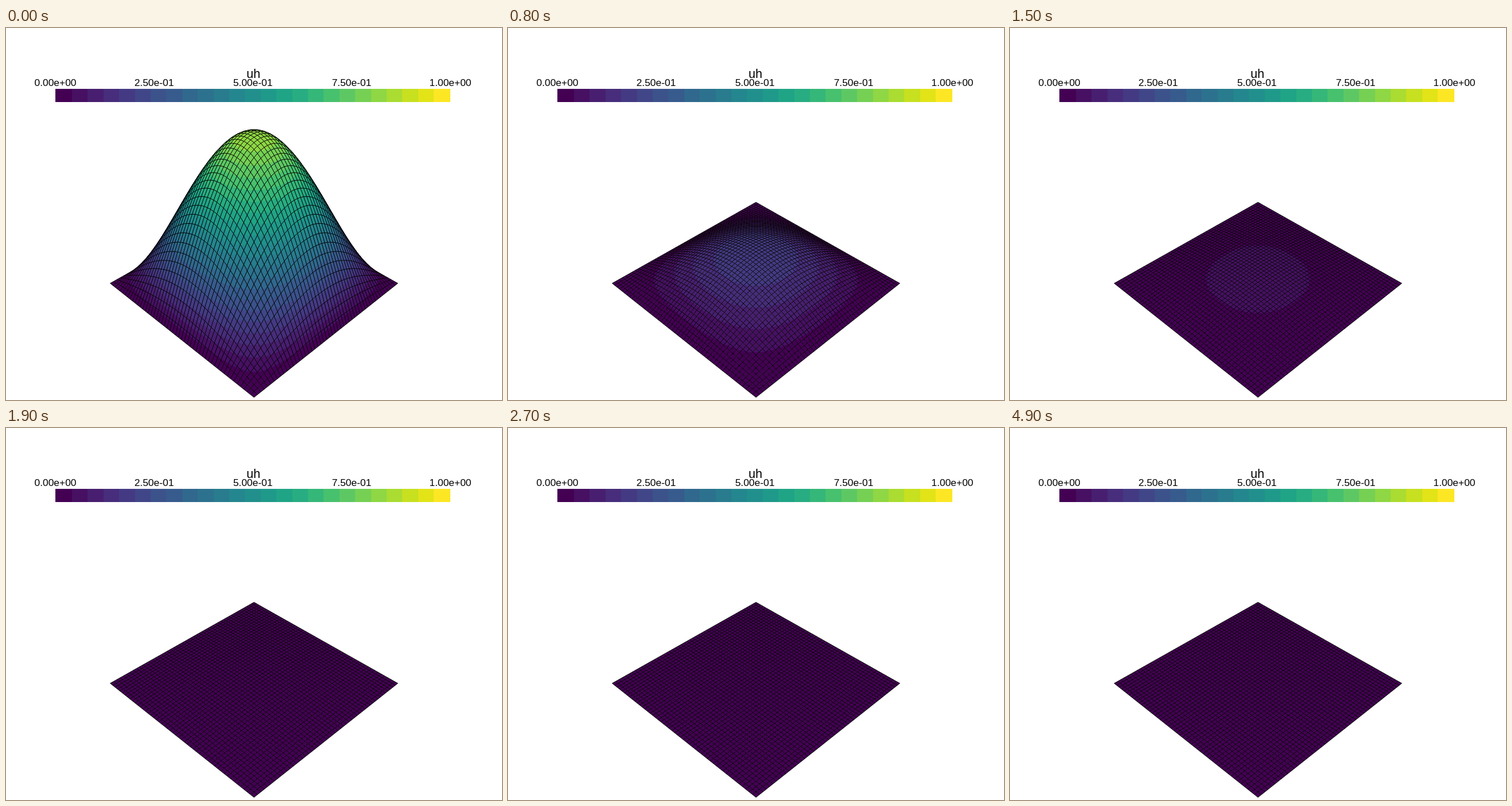
Write an HTML page with a canvas that moves like this. It is 864x648 px and loops after 5 s.

```html
<!DOCTYPE html>
<html lang="en">
<head>
<meta charset="utf-8">
<title>Heat diffusion</title>
<style>
  html, body { margin: 0; width: 100%; height: 100%; overflow: hidden; background: #fff; }
  canvas, svg { position: absolute; left: 0; top: 0; width: 864px; height: 648px; }
  text { font-family: "Liberation Sans", Arial, sans-serif; text-anchor: middle; fill: #000; }
</style>
</head>
<body>
<canvas width="864" height="648"></canvas>
<svg viewBox="0 0 864 648"></svg>
<script>
const W = 864, H = 648, LOOP = 5000, STEP = 100, N = 50;
const viridis = ("440154 471063 481f70 472d7b 443a83 404688 3b528b 375b8d 31688e 2c728e " +
  "287c8e 24868e 21908c 1f9a8a 20a486 27ad81 35b779 47c16e 5dc863 75d054 " +
  "8fd744 aadc32 c7e020 e2e418 fde725").split(" ").map(c => "#" + c);
const BANDS = viridis.length;

// Colour bar
const svg = document.querySelector("svg");
function add(tag, attrs, text = "") {
  const el = document.createElementNS("http://www.w3.org/2000/svg", tag);
  for (const key in attrs) el.setAttribute(key, attrs[key]);
  el.textContent = text;
  svg.append(el);
}
const barEdge = k => k === 0 ? 86 : k === BANDS ? 774 : Math.round(115 + 27.4 * (k - 1));
viridis.forEach((fill, k) => add("rect", {
  x: barEdge(k), y: 106, width: barEdge(k + 1) - barEdge(k), height: 23, fill,
  "shape-rendering": "crispEdges"
}));
["0.00e+00", "2.50e-01", "5.00e-01", "7.50e-01", "1.00e+00"].forEach((label, i) =>
  add("text", { x: 86 + 172 * i, y: 101, "font-size": 17.4 }, label));
add("text", { x: 431, y: 86.5, "font-size": 21.6 }, "uh");

// One implicit Euler step of the slowest mode scales the height by DECAY
const DECAY = 1 / (1 + 0.01 * 2 * Math.PI ** 2);

// Isometric camera, 30 degree view angle, fitted to the first surface
const HALF = Math.PI / 12;
const FOCAL = H / 2 / Math.tan(HALF);
const DIST = Math.hypot(1, 1, DECAY) / 2 / Math.sin(HALF);

function project(x, y, z) {
  const a = x - 0.5, b = y - 0.5, c = z - DECAY / 2;
  const s = FOCAL / (DIST - (a + b + c) / Math.sqrt(3));
  return [W / 2 + (b - a) / Math.SQRT2 * s, H / 2 - (2 * c - a - b) / Math.sqrt(6) * s, z];
}

const ctx = document.querySelector("canvas").getContext("2d");
const wave = Array.from({ length: N + 1 }, (_, i) => Math.sin(Math.PI * i / N));

function fill(points, color) {
  ctx.beginPath();
  points.forEach(p => ctx.lineTo(p[0], p[1]));
  ctx.closePath();
  ctx.fillStyle = color;
  ctx.fill();
}

function line(...points) {
  ctx.beginPath();
  points.forEach(p => ctx.lineTo(p[0], p[1]));
  ctx.stroke();
}

// Part of a polygon where the value is at least `level`
function clipAbove(points, level) {
  const out = [];
  points.forEach((p, i) => {
    const q = points[(i + 1) % points.length];
    if (p[2] >= level) out.push(p);
    if ((p[2] >= level) !== (q[2] >= level)) {
      const t = (level - p[2]) / (q[2] - p[2]);
      out.push(p.map((v, n) => v + (q[n] - v) * t));
    }
  });
  return out;
}

function fillCell(quad) {
  const values = quad.map(p => p[2]);
  const top = Math.max(...values);
  let band = Math.max(0, Math.floor(Math.min(...values) * BANDS));
  fill(quad, viridis[band]);
  while (++band / BANDS < top) fill(clipAbove(quad, band / BANDS), viridis[band]);
}

function draw(step) {
  const peak = DECAY ** (step + 1);
  const grid = wave.map((u, i) => wave.map((v, j) => project(i / N, j / N, peak * u * v)));
  ctx.clearRect(0, 0, W, H);
  ctx.strokeStyle = "#000";
  ctx.lineWidth = 1;
  // Far to near; each cell strokes its two far edges
  for (let i = 0; i < N; i++) {
    for (let j = 0; j < N; j++) {
      const a = grid[i][j], b = grid[i + 1][j], c = grid[i + 1][j + 1], d = grid[i][j + 1];
      fillCell([a, b, c, d]);
      line(b, a, d);
      if (i === N - 1) line(b, c);
      if (j === N - 1) line(d, c);
    }
  }
}

let shown = -1;
function tick() {
  const step = Math.floor(performance.now() % LOOP / STEP);
  if (step !== shown) draw(shown = step);
  requestAnimationFrame(tick);
}
tick();
</script>
</body>
</html>
```
